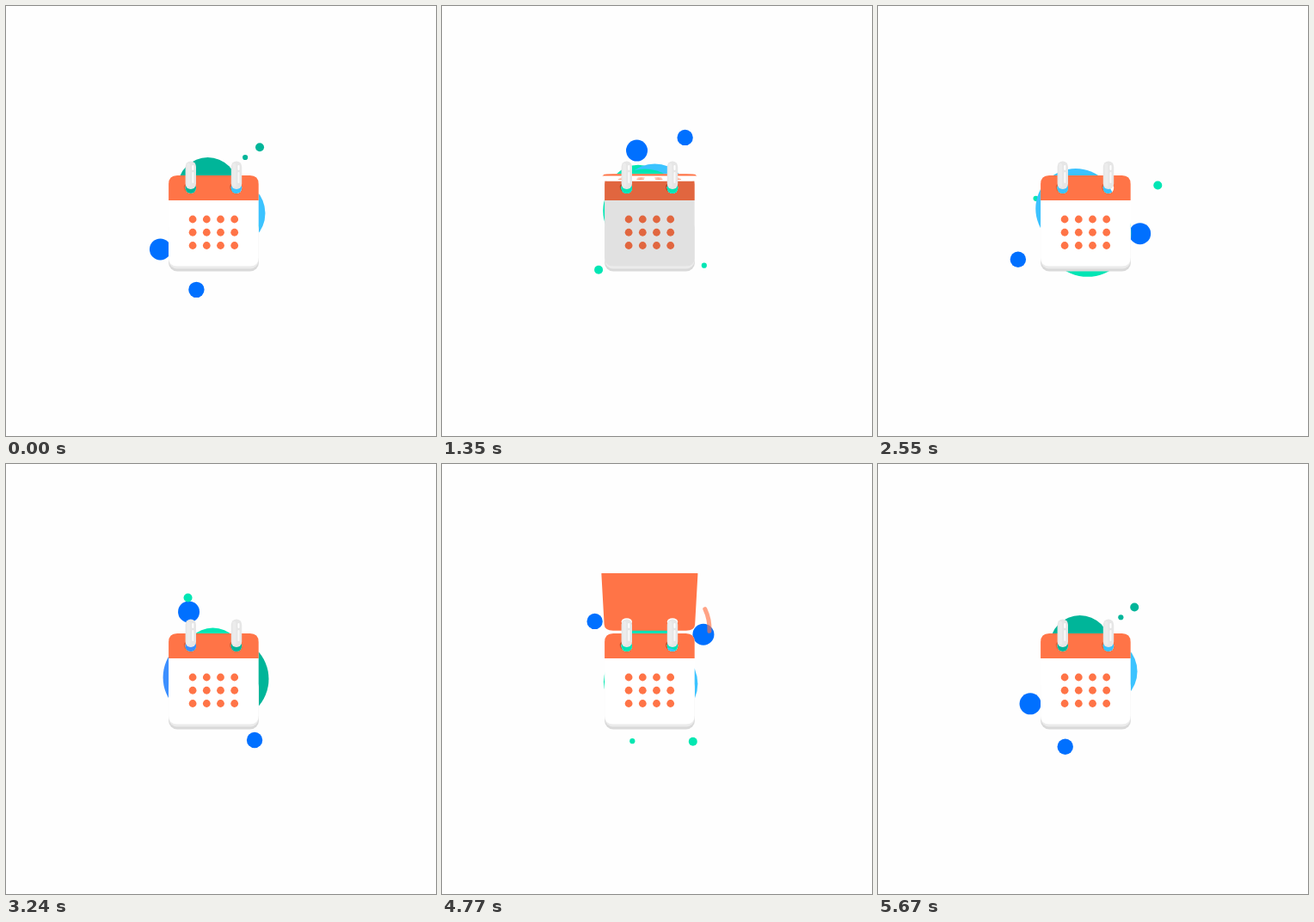
Animation of 500 by 500 pixels, one loop 5.7 s. Source, as an HTML page with a canvas:

```html
<!DOCTYPE html>
<html lang="en">
<head>
<meta charset="utf-8">
<title>Calendar</title>
<style>
  html, body { margin: 0; width: 100%; height: 100%; overflow: hidden; background: #fefefe; }
  canvas { display: block; width: 500px; height: 500px; }
</style>
</head>
<body>
<canvas id="stage" width="500" height="500"></canvas>
<script>
const ctx = document.getElementById('stage').getContext('2d');
const LOOP = 5700, TURN = 5689, STEP = 30;
const BG = '#fefefe', ORANGE = '#ff7447', BLUE = '#0070ff', SKY = '#3cc3ff';
const TEAL = '#00b599', MINT = '#00e6b4', GREEN = '#33ff55';
const RAD = Math.PI / 180;
const HINGE = 195, MID = 241.4, HALF = 52.3, NEAR = 2, FAR = 107.5, HEAD = 31;
const RINGS = [214.8, 268];
const FLIP_START = 685, FLIP_TIME = 1310, FLIP_GAP = 3090;
const GREEN_TIME = 4110;

// Arms are [length, start angle]; each next arm turns once more per loop.
// Tints are [colour, time] and blend in around that time.
const FRESH = [[TEAL, 0], [GREEN, GREEN_TIME]];
const DOTS = [
  { r: 12.5, color: BLUE, arms: [[5.2, -35], [4.1, 169], [74.5, 211.8]] },
  { r: 9.2, color: BLUE, arms: [[5.2, 3.5], [92.5, 253.5]] },
  { r: 5, color: MINT, tints: FRESH, arms: [[3.4, -2.4], [91.7, 57.6]] },
  { r: 3.1, color: MINT, tints: FRESH, arms: [[12.6, 283.6], [15.9, 90.3], [70, 62.1]] }
].map(dot => ({ x: 242.5, y: 241.5, ...dot }));

// Shapes behind the calendar; the radius swells by `swell` at turn angle `peak`.
const BLOBS = [
  { x: 236, y: 219, r: 35, color: MINT, tints: [[TEAL, 0], [BLUE, GREEN_TIME]], arms: [[8, 100]] },
  { x: 246, y: 241, r: 43, swell: 5, peak: 205, color: SKY, tints: [['#3c8fff', 3240]], arms: [[17, 0]] },
  { x: 243, y: 250, r: 46, swell: 5, peak: 145, color: MINT, tints: [[TEAL, 3240], [GREEN, GREEN_TIME]],
    arms: [[0, 0], [14, -50]] }
];

const clamp = v => Math.min(1, Math.max(0, v));
const rgb = hex => [1, 3, 5].map(i => parseInt(hex.slice(i, i + 2), 16));

function tinted(color, tints, t) {
  const mixed = tints.reduce((c, [tint, at]) => {
    const gap = Math.abs(t - at), near = Math.min(gap, TURN - gap);
    const w = Math.sin(90 * RAD * clamp(1 - near / 750)) ** 2;
    return rgb(tint).map((v, i) => c[i] + (v - c[i]) * w);
  }, rgb(color));
  return `rgb(${mixed.map(Math.round)})`;
}

function oval(x, y, rx, ry, color) {
  ctx.beginPath();
  ctx.ellipse(x, y, rx, ry, 0, 0, 7);
  ctx.fillStyle = color;
  ctx.fill();
}

function box(x, y, w, h, r, color) {
  ctx.beginPath();
  ctx.roundRect(x, y, w, h, r);
  ctx.fillStyle = color;
  ctx.fill();
}

function drawOrbiter({ x, y, r, color, arms, tints = [], swell = 0, peak = 0 }, t) {
  const turn = 360 * t / TURN;
  arms.forEach(([len, start], i) => {
    const a = (start + (i + 1) * turn) * RAD;
    x += len * Math.cos(a);
    y -= len * Math.sin(a);
  });
  r += swell * Math.cos((turn - peak) * RAD);
  oval(x, y, r, r, tinted(color, tints, t));
}

const drawBlobs = t => BLOBS.forEach(blob => drawOrbiter(blob, t));

// Page outline for a tilt; u is across, d is the distance from the hinge.
function pagePath(tilt) {
  const f = Math.cos(tilt * RAD), c = 10;
  const k = (0.0014 + 0.0006 * f) * Math.sin(tilt * RAD);
  const at = (u, d) => [MID + u * (1 + k * d), HINGE + f * d];
  const corner = (u0, d0, u, d, u1, d1) => {
    ctx.lineTo(...at(u0, d0));
    ctx.quadraticCurveTo(...at(u, d), ...at(u1, d1));
  };
  ctx.beginPath();
  corner(-HALF, NEAR + c, -HALF, NEAR, c - HALF, NEAR);
  corner(HALF - c, NEAR, HALF, NEAR, HALF, NEAR + c);
  corner(HALF, FAR - c, HALF, FAR, HALF - c, FAR);
  corner(c - HALF, FAR, -HALF, FAR, -HALF, FAR - c);
  ctx.closePath();
}

function drawHoles(f, t) {
  for (const x of RINGS) {
    const y = HINGE + 16.8 * f, h = 6.2 * Math.abs(f);
    if (f < 0) {
      oval(x, y, 6.2, h, BG);
      continue;
    }
    oval(x - 1.2, y - f, 6.8, h, 'rgba(110,45,25,.25)');
    ctx.save();
    ctx.beginPath();
    ctx.ellipse(x, y, 6.2, h, 0, 0, 7);
    ctx.clip();
    ctx.fillStyle = BG;
    ctx.fillRect(x - 9, y - 9, 18, 18);
    drawBlobs(t);
    ctx.restore();
  }
}

function drawPage(tilt, t) {
  const f = Math.cos(tilt * RAD), s = Math.sin(tilt * RAD);
  pagePath(tilt);
  ctx.fillStyle = f < 0 ? ORANGE : '#fff';
  ctx.fill();
  if (f > 0) {
    ctx.save();
    ctx.clip();
    ctx.fillStyle = ORANGE;
    ctx.fillRect(150, HINGE, 200, HEAD * f);
    ctx.restore();
    for (let row = 0; row < 3; row++) {
      const d = 53 + row * 15.25;
      for (let col = 0; col < 4; col++) {
        const u = (col - 1.5) * 16.2;
        oval(MID + u * (1 + 0.004 * s * d), HINGE + d * f, 4.4, 4.4 * f, ORANGE);
      }
    }
  }
  drawHoles(f, t);
}

function drawRings() {
  for (const x of RINGS) {
    box(x - 6.2, 180.5, 12.4, 32.5, 6.2, '#e6e6e6');
    box(x - 4.6, 183, 4, 27.5, 2, '#ececec');
    box(x + 1.5, 185, 2, 6, 1, '#fff');
    box(x + 1.5, 193, 2, 13, 1, '#fafafa');
  }
}

// Arc that sweeps up beside the turning page and thins out.
function drawTrail(q) {
  if (q <= 0 || q >= 1) return;
  const head = 52 * Math.sin(q * 90 * RAD) - 10, tail = 50 * q ** 2.5 - 10;
  ctx.beginPath();
  ctx.arc(256, 192, 55, -head * RAD, -tail * RAD);
  ctx.strokeStyle = `rgba(255,116,71,${0.85 * (1 - q * q)})`;
  ctx.lineWidth = 5;
  ctx.lineCap = 'round';
  ctx.stroke();
}

function drawFlip(ft, t) {
  const p = clamp((ft - FLIP_START) / FLIP_TIME);
  const tilt = 180 * p ** 1.1, fade = clamp((2160 - ft) / 160);
  if (!p || !fade) return;
  pagePath(0);
  ctx.fillStyle = `rgba(0,0,0,${0.21 * clamp((0.65 - p) * 4)})`;
  ctx.fill();
  drawHoles(1, t);
  ctx.save();
  ctx.beginPath();
  ctx.rect(0, 127, 500, 373);
  ctx.clip();
  ctx.globalAlpha = fade;
  drawPage(tilt, t);
  ctx.restore();
}

function draw(t) {
  const ft = t < 3000 ? t : t - FLIP_GAP;
  ctx.fillStyle = BG;
  ctx.fillRect(0, 0, 500, 500);
  DOTS.forEach(dot => drawOrbiter(dot, t));
  drawBlobs(t);
  box(189, 250, 105, 58.5, 10, '#d9d9d9');
  box(189, 250, 105, 55.5, 10, '#ebebeb');
  drawPage(0, t);
  drawFlip(ft, t);
  drawRings();
  drawTrail((ft - 1350) / 700);
}

const began = performance.now();
function tick() {
  const t = (performance.now() - began) % LOOP;
  draw(Math.floor(t / STEP) * STEP);
  requestAnimationFrame(tick);
}
tick();
</script>
</body>
</html>
```
